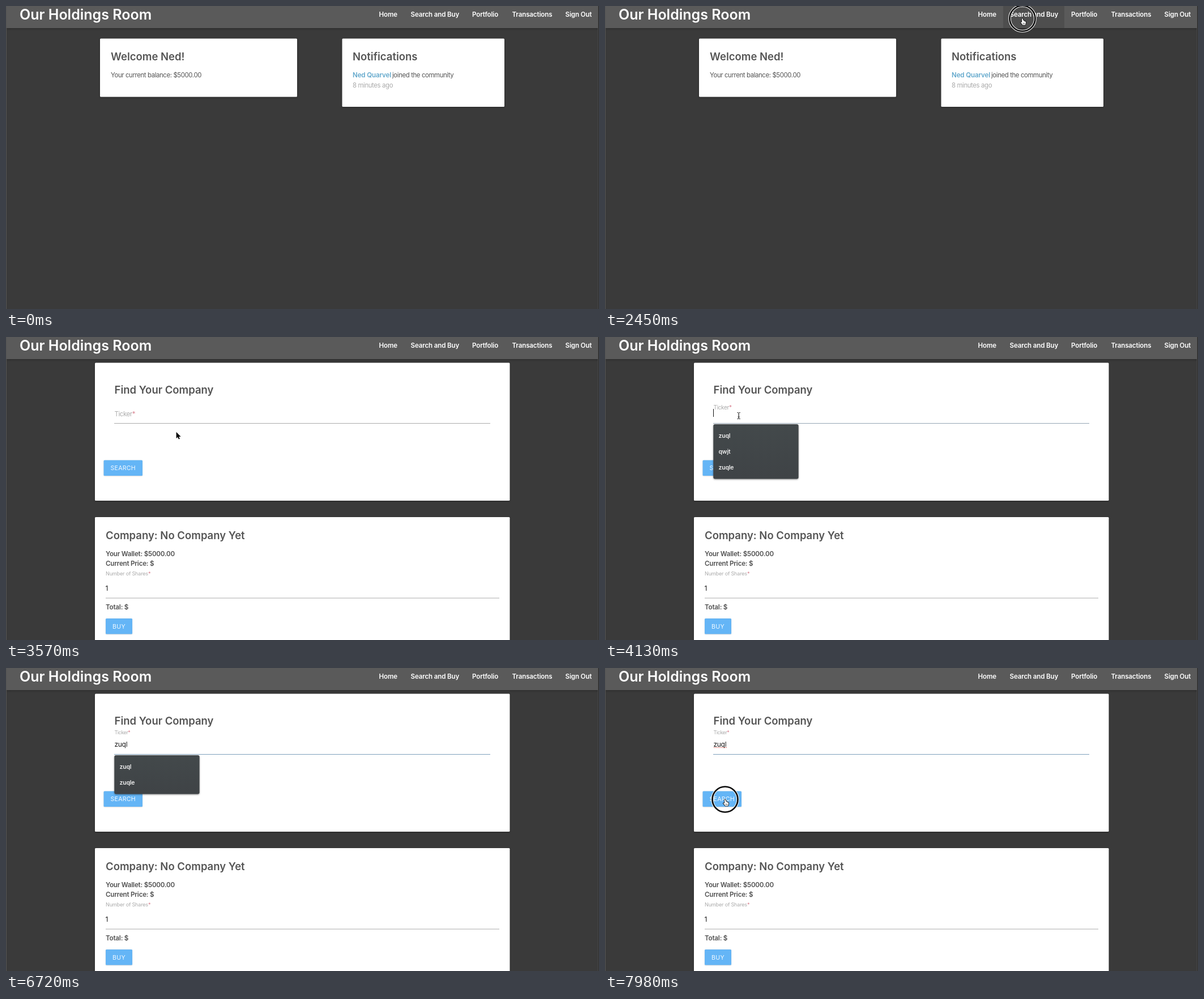
These frames come from a looping animation (1047 px wide and 535 px high, 8000 ms). An HTML page with a canvas:

```html
<!DOCTYPE html>
<html lang="en">
<head>
<meta charset="utf-8">
<title>Stock dashboard</title>
<style>
  html, body { margin: 0; width: 100%; height: 100%; overflow: hidden; background: #3a3a3a; }
  canvas { display: block; width: 1047px; height: 535px; }
</style>
</head>
<body>
<canvas id="stage"></canvas>
<script>
const W = 1047, H = 535, LOOP = 8000, STEP = 70;
const canvas = document.getElementById('stage');
const ctx = canvas.getContext('2d');
const dpr = window.devicePixelRatio || 1;
canvas.width = W * dpr;
canvas.height = H * dpr;

// Text styles: weight, size, letter spacing, colour
const STYLE = {
  brand: [600, 25, 0, '#fff'],
  nav: [600, 11.6, -0.15, '#fff'],
  head: [600, 18.5, 0, '#555'],
  body: [400, 11.4, -0.39, '#555'],
  muted: [400, 11.4, -0.39, '#ababab'],
  link: [600, 11.6, -0.15, '#62a8cc'],
  strong: [600, 11.6, -0.2, '#505050'],
  small: [400, 9.1, -0.2, '#ababab'],
  input: [400, 12, -0.3, '#1a1a1a'],
  button: [400, 10.6, 0.25, '#f4faff'],
  option: [600, 10.4, -0.15, '#f0f0f0']
};

const T = { press: 2240, page: 2520, focus: 4060, list: 4130, submit: 7980 };
const KEYS = [[5180, 'z'], [5390, 'zu'], [5670, 'zuq'], [5740, 'zuql'], [5880, 'zuqle'], [6720, 'zuql']];
const OPTIONS = ['zuql', 'qwjt', 'zuqle'];
const CARET_ON = [[4060, 4550], [5180, 6440], [7000, 7530]];

// Pointer moves: start, end, then from and to points
const MOVES = [
  [350, 840, 4, 522, 685, 317],
  [910, 1190, 685, 317, 763, 89],
  [1400, 2030, 763, 89, 737, 22],
  [2870, 3360, 737, 22, 310, 172],
  [3430, 4060, 310, 172, 236, 139],
  [7070, 7840, 236, 139, 212, 232]
];

const within = (t, [a, b]) => t >= a && t < b;
const clamp = u => Math.max(0, Math.min(1, u));
const smooth = u => u * u * (3 - 2 * u);
const mix = (a, b, u) => a + (b - a) * u;

function text(str, x, y, name, size) {
  const [weight, px, gap, color] = STYLE[name];
  ctx.font = `${weight} ${size || px}px Inter, "Liberation Sans", sans-serif`;
  ctx.letterSpacing = gap + 'px';
  ctx.fillStyle = color;
  ctx.fillText(str, x, y);
  return ctx.measureText(str).width;
}

function required(str, x, y, name, size) {
  const w = text(str, x, y, name, size);
  ctx.fillStyle = '#d9808f';
  ctx.fillText('*', x + w, y);
}

function rect(x, y, w, h, color) {
  ctx.fillStyle = color;
  ctx.fillRect(x, y, w, h);
}

function box(x, y, w, h, color, r = 1.5) {
  ctx.fillStyle = color;
  ctx.beginPath();
  ctx.roundRect(x, y, w, h, r);
  ctx.fill();
}

function shadowed(blur, dy, alpha, draw) {
  ctx.save();
  ctx.shadowColor = `rgba(0,0,0,${alpha})`;
  ctx.shadowBlur = blur * dpr;
  ctx.shadowOffsetY = dy * dpr;
  draw();
  ctx.restore();
}

function card(x, y, w, h) {
  shadowed(3, 1, 0.35, () => box(x, y, w, h, '#fff'));
}

function button(label, x, y, w, h) {
  shadowed(2, 0.5, 0.2, () => box(x, y, w, h, '#64b5f6'));
  ctx.textAlign = 'center';
  text(label, x + w / 2, y + h / 2 + 4, 'button');
  ctx.textAlign = 'left';
}

function navBar(hover) {
  shadowed(4, 1, 0.3, () => rect(0, 0, W, 39, '#5a5a5a'));
  if (hover) rect(703, 0, 108, 39, '#4e4e4e');
  text('Our Holdings Room', 24, 23.5, 'brand');
  const links = [['Home', 658.5], ['Search and Buy', 714.5], ['Portfolio', 823], ['Transactions', 893.5], ['Sign Out', 987.5]];
  for (const [label, x] of links) text(label, x, 19, 'nav');
}

function homePage() {
  card(166, 57.5, 348, 103);
  text('Welcome Ned!', 185, 96, 'head');
  text('Your current balance: $5000.00', 185, 126.3, 'body');
  card(593.5, 57.5, 286.5, 120.5);
  text('Notifications', 612, 96, 'head');
  text('Ned Quarvel', 612, 126.3, 'link');
  text('joined the community', 682, 126.3, 'body');
  text('8 minutes ago', 612, 143.8, 'muted');
}

function searchPage(t, typed) {
  card(157, 45.5, 732.5, 243.5);
  text('Find Your Company', 191.5, 100, 'head');
  const f = t < T.focus ? 0 : 1 - Math.pow(1 - clamp((t - T.focus + 13) / 400), 3);
  required('Ticker', 191.5, mix(139.8, 116.8, f), 'muted', mix(11.4, 8.9, f));
  rect(191, 152, 664, 1, `rgb(${mix(172, 126, f)},${mix(172, 160, f)},${mix(172, 188, f)})`);
  const w = typed ? text(typed, 191.5, 138.5, 'input') : 0;
  if (t >= T.submit) {
    for (let x = 192; x < 191.5 + w; x += 2.4) rect(x, 140, 1.3, 1, '#d5453c');
  }
  if (CARET_ON.some(span => within(t, span))) {
    rect(Math.round(191.3 + w), 127, 1, 14, '#111');
  }
  button('SEARCH', 172.5, 217.5, 68.5, 27.5);

  card(157, 318, 732.5, 240);
  text('Company: No Company Yet', 176, 356.5, 'head');
  text('Your Wallet: $5000.00', 176, 386.8, 'strong');
  text('Current Price: $', 176, 404, 'strong');
  required('Number of Shares', 176, 421.3, 'small');
  text('1', 175.5, 447.7, 'input');
  rect(176, 460.5, 695, 1, '#ababab');
  text('Total: $', 176, 481, 'strong');
  button('BUY', 176, 497, 47, 27.5);
}

function optionList(typed) {
  const items = OPTIONS.filter(o => o.startsWith(typed));
  const h = 12 + items.length * 28.2;
  const fill = ctx.createLinearGradient(0, 154, 0, 154 + h);
  fill.addColorStop(0, '#43494b');
  fill.addColorStop(1, '#3f4346');
  shadowed(3, 1, 0.45, () => box(191.3, 154, 150.3, h, fill, 3));
  items.forEach((o, i) => text(o, 200.5, 178 + i * 28.2, 'option'));
}

function pointerAt(t) {
  if (t < MOVES[0][0] || within(t, [KEYS[0][0], 7140])) return null;
  let p = null;
  for (const [a, b, x0, y0, x1, y1] of MOVES) {
    if (t < a) break;
    const u = smooth(clamp((t - a) / (b - a)));
    p = { x: mix(x0, x1, u), y: mix(y0, y1, u) };
  }
  return p;
}

function outline(path, fill, edge, width) {
  ctx.lineJoin = 'round';
  ctx.strokeStyle = edge;
  ctx.lineWidth = width;
  ctx.stroke(path);
  ctx.fillStyle = fill;
  ctx.fill(path);
}

const ARROW = new Path2D('M0 0V11.2L2.6 8.8L4.3 12.6L6.2 11.8L4.6 8.1H8Z');
const HAND = new Path2D('M-.9 .8Q0-.6 .9 .8V4.6Q2-.0 2.7 4.9Q4 4 4.4 5.4Q6.2 4.8 6.2 6.8Q6.2 9 5.1 11.4H.2Q-1.2 9-3.1 7.1Q-3.2 5.4-.9 6.9Z');

function drawPointer(kind, { x, y }) {
  ctx.save();
  ctx.translate(x, y);
  if (kind === 'arrow') outline(ARROW, '#000', '#fff', 1.6);
  if (kind === 'hand') {
    outline(HAND, '#fff', '#000', 1.5);
    for (let i = 0; i < 3; i++) rect(0.7 + i * 1.6, 7.6, 0.6, 2.4, '#222');
  }
  if (kind === 'beam') {
    rect(-0.5, -5, 1.2, 10.5, '#222');
    for (const v of [-6, 5]) {
      rect(-2.6, v, 2.1, 1, '#222');
      rect(0.7, v, 2.1, 1, '#222');
    }
    rect(-1.6, 1.8, 3.4, 0.9, '#222');
  }
  ctx.restore();
}

function clickRing({ x, y }) {
  for (const [width, color] of [[4.6, '#fff'], [2.7, '#0c0c0c']]) {
    ctx.beginPath();
    ctx.arc(x, y, 22.5, 0, Math.PI * 2);
    ctx.lineWidth = width;
    ctx.strokeStyle = color;
    ctx.stroke();
  }
}

function render(time) {
  const t = Math.floor((time % LOOP) / STEP) * STEP;
  const key = KEYS.filter(k => t >= k[0]).pop();
  const typed = key ? key[1] : '';
  const listOpen = within(t, [T.list, T.submit]);
  const search = t >= T.page;
  const p = pointerAt(t);
  const over = (x0, y0, x1, y1) => p && p.x >= x0 && p.x <= x1 && p.y >= y0 && p.y <= y1;
  const navHover = over(703, 0, 811, 39);

  ctx.setTransform(dpr, 0, 0, dpr, 0, 0);
  rect(0, 0, W, H, '#3a3a3a');
  navBar(navHover);
  if (search) searchPage(t, typed); else homePage();
  if (listOpen) optionList(typed);
  if (navHover && search) rect(157, 533, 37, 2, '#e6e6e6');
  rect(0, 0, 1, H, '#555');
  rect(1045, 0, 1, H, '#4c4c4c');
  rect(1046, 0, 1, H, '#262626');

  if (!p) return;
  const pressed = within(t, [T.press, T.page]) || t === T.focus || t >= T.submit;
  let kind = 'arrow';
  if (navHover || (search && over(172, listOpen ? 223 : 217, 241, 245))) kind = 'hand';
  else if (search && over(191, 122, 855, 153)) kind = 'beam';
  if (pressed) clickRing(p);
  drawPointer(kind, p);
}

const start = performance.now();
function tick() {
  render(performance.now() - start);
  requestAnimationFrame(tick);
}
tick();
</script>
</body>
</html>
```
